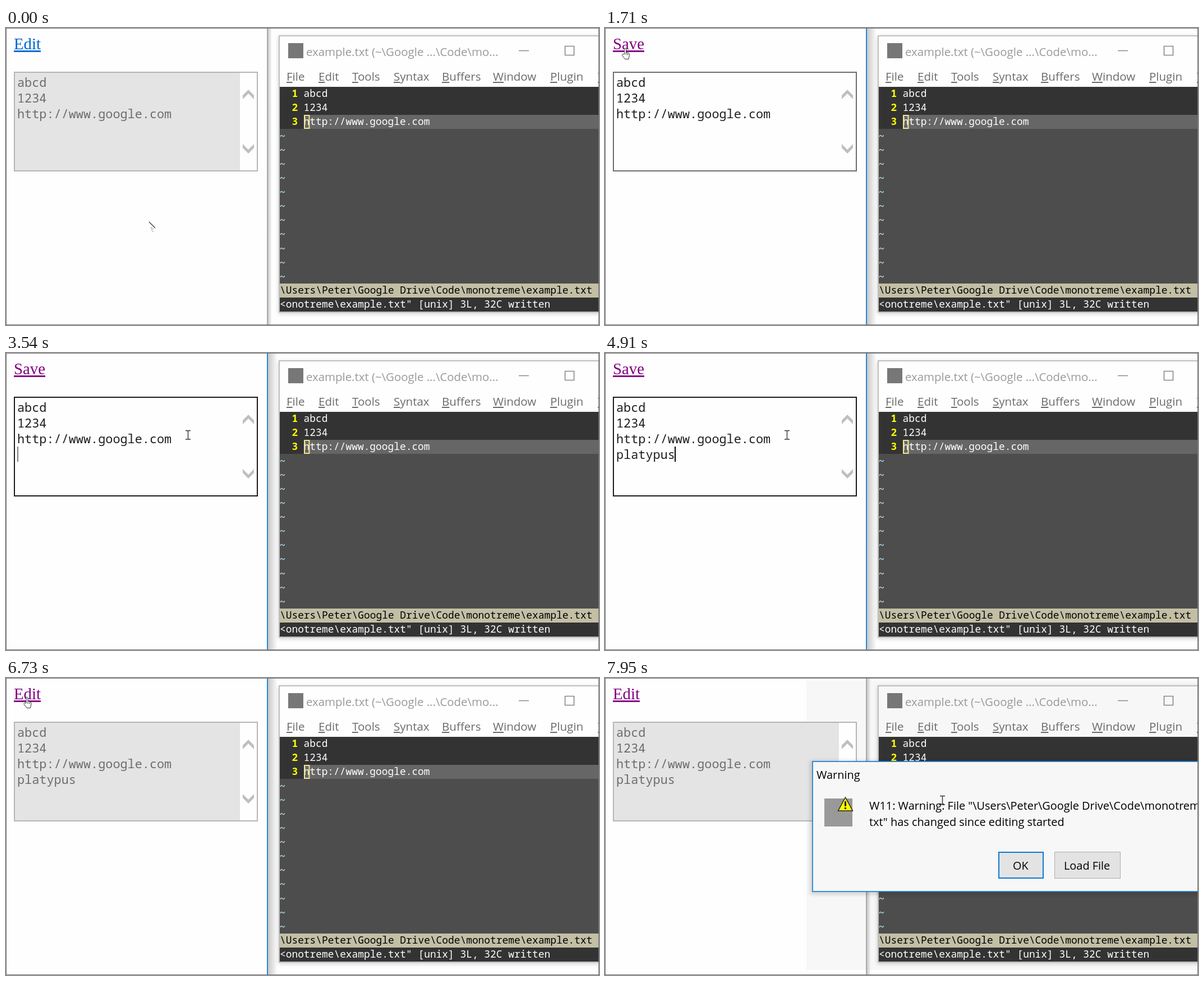
These frames come from a looping animation (1057x530 px, 8 s). An HTML page:

```html
<!DOCTYPE html>
<html lang="en">
<head>
<meta charset="utf-8">
<title>Edit in browser and editor</title>
<style>
html, body { margin: 0; width: 100%; height: 100%; overflow: hidden; background: #fefefe; }
svg { display: block; width: 1057px; height: 530px; }
text { white-space: pre; }
.link { font: 28.8px "Liberation Serif", serif; text-decoration: underline; }
.area { font: 21.85px "Noto Sans Mono", monospace; }
.vim { font: 17.86px "Noto Sans Mono", monospace; }
.ui { font: 20.5px "Open Sans", sans-serif; }
.dialog { font: 19.9px "Open Sans", sans-serif; }
.key { text-decoration: underline; }
.bold { font-weight: bold; }
</style>
</head>
<body>
<svg viewBox="0 0 1057 530">
  <defs>
    <linearGradient id="fade">
      <stop offset="0" stop-color="#c8c8c8"/>
      <stop offset="1" stop-color="#c8c8c8" stop-opacity="0"/>
    </linearGradient>
    <filter id="soft" x="-10%" y="-10%" width="120%" height="120%"><feGaussianBlur stdDeviation="3"/></filter>
  </defs>
  <rect width="1057" height="530" fill="#fefefe"/>
  <path id="dim" d="M359 5h698v516H359z" fill="#f7f7f7"/>

  <!-- browser -->
  <text id="link" class="link" x="14" y="38"></text>
  <rect id="box" x="15" y="79" width="433" height="176" stroke-width="2"/>
  <path d="M417 80h30v174h-30z" fill="#fefefe"/>
  <path d="M422 120l10-10 10 10v7l-10-10-10 10zM422 214l10 10 10-10v-7l-10 10-10-10z" fill="#bfbfbf"/>
  <g id="lines" class="area"></g>
  <rect id="caret" width="2" height="27"/>
  <rect id="edgeShade" x="467" width="6" height="530" fill="url(#fade)"/>
  <rect id="edge" x="465" width="2" height="530"/>

  <!-- editor window -->
  <rect x="485" y="14" width="600" height="497" rx="4" fill="#000" opacity=".14" filter="url(#soft)"/>
  <rect id="frame" x="487" y="14" width="600" height="493"/>
  <rect x="503" y="27" width="27" height="27" fill="#777"/>
  <text id="title" class="ui" x="535" y="50" style="font-size:20.4px">example.txt (~\Google ...\Code\mo...</text>
  <path id="buttons" d="M914 40.5h18M996.5 32.5h16v16h-16z" fill="none"/>
  <g id="menu" class="ui" fill="#6b6b6b"></g>
  <path d="M488 105h569v401H488z" fill="#4d4d4d"/>
  <path d="M488 105h569v75H488zM488 481h569v25H488z" fill="#333"/>
  <path d="M531 155h526v25H531z" fill="#666"/>
  <path d="M488 456h569v25H488z" fill="#c2bfa5"/>
  <g id="code" class="vim"></g>
  <rect x="532" y="156" width="8.5" height="23" fill="none" stroke="#f0e68c" stroke-width="2"/>

  <!-- warning -->
  <g id="warning" class="dialog">
    <rect x="365" y="147" width="720" height="240" rx="4" opacity=".13" filter="url(#soft)"/>
    <rect x="370" y="149" width="720" height="232" fill="#f7f7f7" stroke="#1a7fd4" stroke-width="1.700"/>
    <rect x="391" y="215" width="50" height="50" fill="#999"/>
    <path d="M428.500 213l13 24h-26z" fill="#ff0" stroke="#222" stroke-width="1.500"/>
    <path d="M428.500 220v9M428.500 231v3" stroke="#111" stroke-width="3"/>
    <text x="377" y="180">Warning</text>
    <text x="471" y="235">W11: Warning: File "\Users\Peter\Google Drive\Code\monotreme\example.</text>
    <text x="471" y="264">txt" has changed since editing started</text>
    <rect x="702" y="311" width="79" height="46" fill="#e3e3e3" stroke="#0f78d4" stroke-width="2"/>
    <rect x="801.500" y="310.500" width="117" height="47" fill="#e3e3e3" stroke="#adadad"/>
    <text x="727" y="342">OK</text>
    <text x="818" y="342">Load File</text>
  </g>

  <g id="pointer">
    <path id="arrow" d="M0 0l11 11" stroke-width="1.300" fill="none"/>
    <path id="tail" d="M3 11l3-1M4 14l4-2M6 17l2-1" stroke-dasharray="1.500 1" fill="none"/>
    <path id="hand" d="M5 12V2q1.500-2.500 3 0v6l4 1.500q2.500.5 2 4l-1.500 7H6l-5-7q-.5-3 4-1.500M8 8v5M11 9.500v4" fill="#fefefe"/>
    <path id="beam" d="M0 .5h3.500l1 1 1-1H9M4.500 1v14.500M0 16h3.500l1-1 1 1H9" fill="none" stroke-width="1.400"/>
  </g>
  <rect x=".5" y=".5" width="1056" height="529" fill="none" stroke="#707070"/>
</svg>
<script>
const $ = id => document.getElementById(id);
const set = (id, attrs) => { for (const k in attrs) $(id).setAttribute(k, attrs[k]); };

function label(parent, x, y, str, fill = '', cls = '') {
  const el = document.createElementNS('http://www.w3.org/2000/svg', 'text');
  el.textContent = str;
  for (const [k, v] of Object.entries({ x, y, fill, class: cls })) if (v) el.setAttribute(k, v);
  parent.append(el);
  return el;
}

const address = 'http://www.google.com';
['abcd', '1234', address].forEach((s, i) => {
  label($('lines'), 20, 104.5 + 28.3 * i, s);
  label($('code'), 509.4, 123 + 25 * i, i + 1, '#ff0', 'bold');
  label($('code'), 530.5, 123 + 25 * i, s, '#fff');
});
const typed = label($('lines'), 20, 189.4, '');
for (let i = 0; i < 11; i++) label($('code'), 487.5, 199 + 25.07 * i, '~', '#add8e6', 'bold');
label($('code'), 488, 474, '\\Users\\Peter\\Google Drive\\Code\\monotreme\\example.txt', '#000');
label($('code'), 488, 499, '<onotreme\\example.txt" [unix] 3L, 32C written', '#fff');

const menus = { File: 500, Edit: 557, Tools: 617, Syntax: 691, Buffers: 777, Window: 868, Plugin: 970, T: 1055 };
for (const name in menus)
  label($('menu'), menus[name], 94, '').innerHTML = `<tspan class="key">${name[0]}</tspan>${name.slice(1)}`;

// Each track is a list of [start, ...values]; a value holds until the next start.
const pointerTrack = [
  [0, 'arrow', 255, 346], [550, 'arrow', 205, 264], [670, 'arrow', 128, 144], [820, 'arrow', 78, 74],
  [970, 'hand', 38, 42], [1130, 'hand', 29.5, 35], [2270, 'arrow', 140, 62], [2400, 'beam', 284, 108],
  [2550, 'beam', 313, 129], [2700, 'beam', 320, 138], [5480, 'beam', 211, 81], [5630, 'arrow', 117, 65],
  [5790, 'arrow', 67, 49], [5940, 'hand', 31, 33], [7410, 'arrow', 210, 84], [7530, 'beam', 611, 228],
  [7650, 'beam', 597, 210]
];
const borderTrack = [
  [0, '#b5b5b5'], [1710, '#6c6c6c'], [2270, '#555'], [2400, '#444'], [2700, '#2c2c2c'], [2830, '#1a1a1a'],
  [6340, '#383838'], [6460, '#555'], [6580, '#6c6c6c'], [6730, '#b5b5b5']
];
const typeTrack = [[0, 0], [3660, 2], [3780, 3], [3940, 4], [4090, 5], [4520, 6], [4790, 7], [4910, 8]];
const caretTrack = [
  [0, 0], [2700, 1], [3540, .5], [3660, 1], [5220, .5], [5340, 0], [5480, 1], [5790, .5], [5940, 0]
];
const at = (track, t) => track.findLast(k => k[0] <= t).slice(1);
const shown = on => ({ visibility: on ? 'visible' : 'hidden' });

function draw(t) {
  const editing = t >= 1710 && t < 6730;
  const browserActive = t >= 1710 && t < 7800;
  const vimActive = t >= 7800 && t < 7950;
  const warned = t >= 7950;

  $('link').textContent = editing ? 'Save' : 'Edit';
  set('link', { fill: t < 1710 ? '#0066cc' : '#800080' });
  set('box', { fill: editing ? '#fefefe' : '#e4e4e4', stroke: at(borderTrack, t)[0] });
  set('lines', { fill: editing ? '#1e1e1e' : '#6d6d6d' });

  const [count] = at(typeTrack, t);
  typed.textContent = 'platypus'.slice(0, count);
  const newLine = t >= 3110;
  set('caret', {
    x: 20 + 13.11 * (newLine ? count : address.length) - (count ? .8 : 0),
    y: newLine ? 167 : 139,
    opacity: at(caretTrack, t)[0]
  });

  set('edge', { fill: browserActive ? '#2b87d1' : '#aaa' });
  set('edgeShade', { width: browserActive ? 17 : 7 });
  set('frame', {
    fill: warned ? '#f7f7f7' : '#fefefe',
    stroke: vimActive ? '#1a7fd4' : '#aaa',
    'stroke-width': vimActive ? 2 : 1.4
  });
  set('title', { fill: vimActive ? '#000' : '#999' });
  set('buttons', { stroke: vimActive ? '#000' : '#888', 'stroke-width': vimActive ? 2 : 1.6 });
  set('dim', shown(warned));
  set('warning', shown(warned));

  const [shape, x, y] = at(pointerTrack, t);
  for (const id of ['arrow', 'hand', 'beam']) set(id, shown(id === shape));
  set('tail', shown(shape === 'arrow'));
  const overDark = x > 487 && !warned;
  set('pointer', { transform: `translate(${x} ${y})`, stroke: overDark ? '#ccc' : '#333' });
}

const start = performance.now();
function tick() {
  draw((performance.now() - start) % 8000);
  requestAnimationFrame(tick);
}
tick();
</script>
</body>
</html>
```
